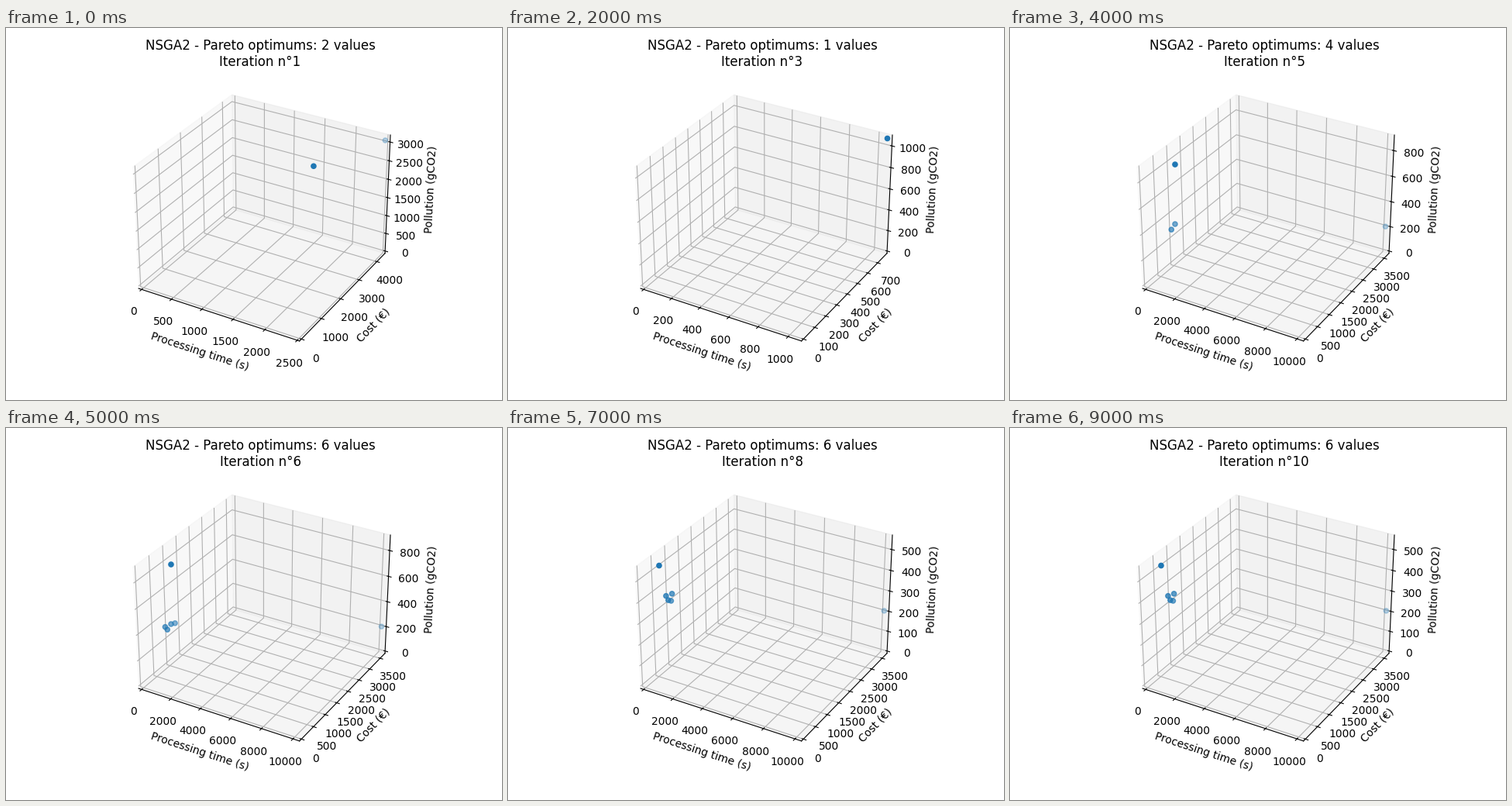
A matplotlib script that plays this animation: 640 by 480 pixels, repeating every 10 s.

```python
import numpy as np
import matplotlib.pyplot as plt
from matplotlib.animation import FuncAnimation

plt.rcParams["font.family"] = "DejaVu Sans"

# Solutions as (processing time, cost, pollution)
FAST = (724, 568, 371)
SLOW = (1282, 487, 900)
FAR = (10200, 3660, 206)
MID = (662, 743, 383)
LEAN = (606, 554, 390)
WIDE = (538, 957, 350)
CHEAP = (1282, 455, 564)
BEST = (683, 308, 557)
CLEAN = (523, 775, 343)

START = [(2483, 4380, 3060), (2008, 2212, 3120)]
FINAL = [FAST, FAR, MID, LEAN, BEST, CLEAN]

# Pareto front of every iteration
FRONTS = [
    START,
    START,
    [(1066, 780, 1077)],
    [SLOW, FAST],
    [SLOW, FAST, FAR, MID],
    [SLOW, FAST, FAR, MID, LEAN, WIDE],
    [CHEAP, FAST, FAR, MID, LEAN, WIDE],
    FINAL,
    FINAL,
    FINAL,
]
MARGIN = 1 / 48

fig = plt.figure(figsize=(6.4, 4.8), dpi=100)
ax = fig.add_subplot(projection="3d")


def draw(i):
    front = np.array(FRONTS[i], dtype=float)
    ax.cla()
    ax.scatter(*front.T)
    top = front.max(axis=0)
    for set_lim, high in zip((ax.set_xlim, ax.set_ylim, ax.set_zlim), top):
        set_lim(-high * MARGIN, high * (1 + MARGIN))
    ax.set_xlabel("Processing time (s)")
    ax.set_ylabel("Cost (€)")
    ax.set_zlabel("Pollution (gCO2)")
    ax.set_title(f"NSGA2 - Pareto optimums: {len(front)} values\n"
                 f"Iteration n°{i + 1}")
    return []


anim = FuncAnimation(fig, draw, frames=len(FRONTS), init_func=lambda: draw(0),
                     interval=1000, repeat=True, repeat_delay=0)
plt.show()
```
